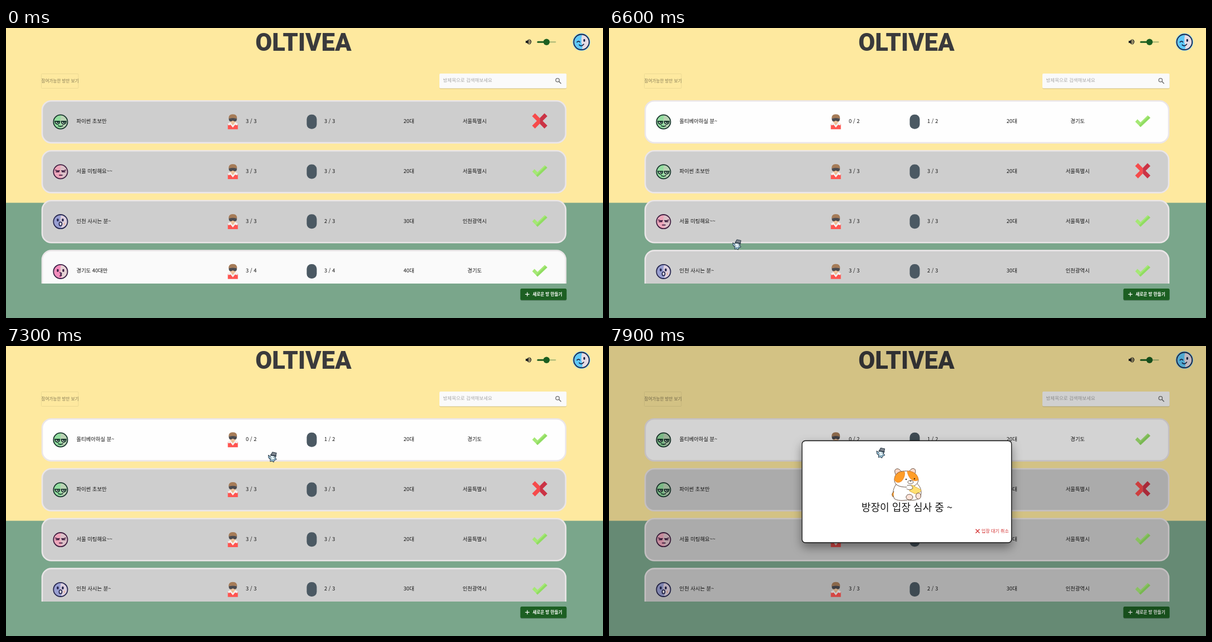
Animation of 1073x522 px, one loop 8 s. Source, as an HTML page:

```html
<!DOCTYPE html>
<html lang="ko">
<head>
<meta charset="utf-8">
<title>Room list</title>
<style>
html, body { margin: 0; width: 100%; height: 100%; overflow: hidden; background: #7aa68b; }
svg { display: block; width: 1073px; height: 522px; }
text { font-family: "Noto Sans CJK KR", "Noto Sans CJK", "Noto Sans", sans-serif; font-size: 9.4px; fill: #141414; }
.logo { font: 900 43.5px Roboto, "Open Sans", sans-serif; fill: #3a3a3c; }
.mid { text-anchor: middle; }
.line { fill: none; stroke-linecap: round; stroke-linejoin: round; }
</style>
</head>
<body>
<svg viewBox="0 0 1073 522" xmlns="http://www.w3.org/2000/svg">
  <defs>
    <clipPath id="list"><rect x="60" y="120" width="952" height="340"/></clipPath>
    <filter id="soft" x="-20%" y="-30%" width="140%" height="180%">
      <feDropShadow dx="0" dy="1" stdDeviation=".7" flood-opacity=".25"/>
    </filter>
    <filter id="deep" x="-20%" y="-30%" width="140%" height="180%">
      <feDropShadow dx="0" dy="8" stdDeviation="9" flood-opacity=".4"/>
    </filter>
    <g id="man">
      <path d="M-9 14V6Q-9 3-4 2H4Q9 3 9 6V14Z" fill="#ff5450"/>
      <path d="M-9 4L-4 1H4L9 4L8 7L4 6L0 11L-4 6L-8 7Z" fill="#f5f1ef"/>
      <path d="M-3-1H3V3L0 7L-3 3Z" fill="#eab98f"/>
      <ellipse cy="-3.5" rx="6.5" ry="7" fill="#f0c59e"/>
      <path d="M-7.5-4Q-8.5-13 0-13T7.5-4L6-6H-6Z" fill="#a67c58"/>
      <path d="M-7-5.5Q0-7 7-5.5Q8 0 3 0L0-1.5L-3 0Q-8 0-7-5.5Z" fill="#4b4b50"/>
    </g>
    <rect id="woman" x="-9" y="-13" width="18" height="26" rx="8.5" fill="#4b5963"/>
    <g id="yes">
      <path d="M-13.5 1.5L-9.5-3L-4 2.5L9-10L13.5-5.5L-4 11Z" fill="#a5e875"/>
      <path d="M-4 11L-6.5 8.3L10.9-8.2L13.5-5.5Z" fill="#90dc62"/>
    </g>
    <g id="no">
      <path d="M0-5L-8.5-13.7L-13.7-8.5L-5.2 0L-13.7 8.5L-8.5 13.7L0 5Z" fill="#f64b4b"/>
      <path d="M0-5L8.5-13.7L13.7-8.5L5.2 0L13.7 8.5L8.5 13.7L0 5Z" fill="#cb3345"/>
    </g>
  </defs>

  <rect width="1073" height="522" fill="#7aa68b"/>
  <rect width="1073" height="314.6" fill="#fee99f"/>
  <text class="logo mid" x="534.5" y="41.3">OLTIVEA</text>

  <path d="M934 23H936.5L939.5 20V30L936.5 27H934Z" fill="#222"/>
  <path class="line" d="M941 23Q942.4 25 941 27M941 20.8Q946.6 25 941 29.2" stroke="#222" stroke-width="1.2"/>
  <path class="line" d="M972 25.3H987.5" stroke="#a6b675" stroke-width="2"/>
  <path class="line" d="M956 25.3H972" stroke="#1b5e20" stroke-width="3"/>
  <circle cx="971.5" cy="25.3" r="5.7" fill="#1b5e20"/>
  <g id="profile" transform="translate(1034.3 25.3)"></g>

  <rect x="63.5" y="82.5" width="66.5" height="26" rx="1" fill="none" stroke="#ecda94"/>
  <text x="63.5" y="97.5" style="font-size:7.6px;fill:#857a55">참여가능한 방만 보기</text>
  <rect x="779" y="82" width="228.5" height="26.5" rx="2" fill="#fafafa" filter="url(#soft)"/>
  <text x="785.5" y="97.3" style="font-size:8.5px;fill:#a9a9a9">방제목으로 검색해보세요</text>
  <circle cx="991.3" cy="93.8" r="3.2" fill="none" stroke="#707070" stroke-width="1.3"/>
  <path class="line" d="M993.8 96.4L997.3 99.8" stroke="#707070" stroke-width="1.5"/>

  <g id="rooms" clip-path="url(#list)"></g>

  <rect x="924.5" y="469" width="83" height="20.8" rx="2.5" fill="#1b5e20" filter="url(#soft)"/>
  <path d="M933.2 479.3H940.8M937 475.5V483.1" stroke="#fff" stroke-width="1.2"/>
  <text x="946.5" y="482" style="font-size:7.6px;font-weight:700;fill:#fff">새로운 방 만들기</text>

  <g id="modal">
    <rect width="1073" height="522" opacity=".17"/>
    <rect x="347" y="170.5" width="376.5" height="183.5" rx="6" fill="#fff" stroke="#111" stroke-width="1.3" filter="url(#deep)"/>
    <g class="line" stroke="#4b3524" stroke-width=".9" stroke-dasharray="3 1">
      <path d="M516 249Q507 262 513 275Q521 280 537 277Q555 280 560 270Q564 257 553 247Z" fill="#fff"/>
      <path d="M515 231Q511 221 519 221Q523 222 525 226M540 225Q545 218 550 222Q552 227 549 231" fill="#ffd9c8"/>
      <path d="M513 241Q513 225 533 225Q554 225 556 241Q555 254 535 254Q513 254 513 241Z" fill="#fff"/>
      <path d="M513 241Q514 226 531 226Q533 235 526 243Q518 249 513 241ZM536 225Q554 226 556 241Q549 245 542 239Q537 233 536 225Z" fill="#ff9d28" stroke="#e9821d"/>
      <path d="M512 262Q506 267 511 272" fill="#ff9d28"/>
      <path d="M544 250L561 259Q560 265 550 266L540 261Z" fill="#ffdf70" stroke="#d8a73c"/>
      <path d="M536 251Q545 249 546 256Q541 261 535 257" fill="#fff"/>
      <ellipse cx="540" cy="272" rx="6" ry="5" fill="#ffe3d8"/>
      <ellipse cx="556" cy="270" rx="4.5" ry="5.5" fill="#ffe3d8"/>
      <ellipse cx="542" cy="245" rx="5" ry="3" fill="#fff"/>
    </g>
    <g fill="#33251d"><circle cx="534" cy="240" r="1.2"/><circle cx="549" cy="239" r="1.2"/><circle cx="542" cy="243" r="1"/></g>
    <text class="mid" x="535.5" y="296.5" style="font-size:18.1px">방장이 입장 심사 중 ~</text>
    <path d="M659 329.8L666 336.8M666 329.8L659 336.8" stroke="#d32f2f" stroke-width="1.3"/>
    <text x="669.5" y="336" style="font-size:8.1px;fill:#d32f2f">입장 대기 취소</text>
  </g>

  <g id="cursor" stroke="#33424f" stroke-linejoin="round">
    <path d="M-4-1L-7.5-3.5L-7 1L-4 4L-4 8L-1 7L2 9L3 6L7 4L5 1L5-2Z" fill="#a9dcf4" stroke-width="1.1"/>
    <ellipse cx="0" cy="1" rx="4.2" ry="4" fill="#e6f7ff" stroke-width=".7"/>
    <path d="M-2 1V2M2 0V1" stroke-width="1.2"/>
    <path d="M-3-4L0-9L7-7.5L6-2.5Z" fill="#7e858e" stroke-width="1.2"/>
    <path d="M-4-3.8L7-1.5" stroke-width="1.6"/>
  </g>
</svg>
<script>
const LOOP = 8000, ROW_STEP = 89.8;
const $ = id => document.getElementById(id);

const faces = {
  sleepy: `<path d="M-10-1H-1.5Q-2 4-5.5 4T-10-1ZM1.5-1H10Q9 4 5.5 4T1.5-1Z" fill="#e4f1e2"/><path d="M-6 1H-4M5 1H7M-4 7Q0 9 4 7"/>`,
  calm: `<path d="M-9-3Q-6-1-2-2M2-2Q6-1 9-3M-8 0H-3M3 0H8M-2 6H3"/>`,
  gasp: `<path d="M-5-4V-2M4-4V-2" stroke-width="3.4"/><ellipse cy="4" rx="2.5" ry="3.3" fill="#fff"/><path d="M5 4L8 1V7Z" fill="#e5b7a5" stroke="none"/>`,
  kiss: `<path d="M-5-3V-1M5-3V-1" stroke-width="3.2"/><path d="M-1 2Q4 3 0 5Q4 7-1 8"/>`,
  wink: `<path d="M-8 0Q-5-3-3 0M-4 5Q0 9 4 4"/><path d="M5-4V-2" stroke-width="3"/>`
};

function avatar(left, right, face, edge, r = 12.6) {
  return `<circle r="${r}" fill="${right}"/>
    <path d="M1 ${-r}A${r} ${r} 0 0 0 1 ${r}Q3 6 0 2Q-1-6 1 ${-r}Z" fill="${left}"/>
    <g class="line" stroke="${edge}" stroke-width="1.8"><circle r="${r}"/>${faces[face]}</g>`;
}

const green = avatar("#93dda0", "#b9d3b4", "sleepy", "#17352c");
const rooms = [
  { title: "올티베아하실 분~", men: "0 / 2", women: "1 / 2", age: "20대", area: "경기도", mark: "yes", fill: "#fefefe", face: green },
  { title: "파이썬 초보만", men: "3 / 3", women: "3 / 3", age: "20대", area: "서울특별시", mark: "no", face: green },
  { title: "서울 미팅해요~~", men: "3 / 3", women: "3 / 3", age: "20대", area: "서울특별시", mark: "yes", face: avatar("#eda6bb", "#dcc0c8", "calm", "#401e40") },
  { title: "인천 사시는 분~", men: "3 / 3", women: "2 / 3", age: "30대", area: "인천광역시", mark: "yes", face: avatar("#999fd2", "#ddd0df", "gasp", "#24254f") },
  { title: "경기도 40대만", men: "3 / 4", women: "3 / 4", age: "40대", area: "경기도", mark: "yes", fill: "#fafafa", face: avatar("#f58dbd", "#e7d2d5", "kiss", "#391d43") }
];

function roomRow(room) {
  const label = (x, text, cls = "") => `<text class="${cls}" x="${x}" y="41">${text}</text>`;
  const icon = (id, x, y) => `<use href="#${id}" x="${x}" y="${y}"/>`;
  return `<g><rect x="65" y="1.2" width="941" height="75.4" rx="16.5" fill="${room.fill || "#cecece"}" stroke="#ebe6e8" stroke-width="2.6"/>
    <g transform="translate(98 39)">${room.face}</g>
    ${label(126.5, room.title)}${icon("man", 407.7, 38.3)}${label(431, room.men)}
    ${icon("woman", 549.5, 38.7)}${label(572, room.women)}
    ${label(724, room.age, "mid")}${label(842.3, room.area, "mid")}
    ${icon(room.mark, 959.3, 37.2)}</g>`;
}

$("rooms").innerHTML = rooms.map(roomRow).join("");
$("profile").innerHTML = `<circle r="15.8" fill="#79c9f2"/>` + avatar("#5fc9fa", "#e5dce5", "wink", "#1a2547", 13.8);
const rows = [...$("rooms").children];

// Pointer positions: [time, x, y], each held until the next.
const pointer = [
  [6600, 230, 390], [6700, 310, 325], [6800, 400, 258], [6900, 465, 216], [7000, 488, 204],
  [7300, 479, 200], [7400, 482, 197], [7600, 486, 194], [7700, 488.5, 192.5]
];

function draw(t) {
  const shift = t < 5800 ? 1 : 0;
  rows.forEach((row, i) => {
    row.style.display = i < shift ? "none" : "";
    row.setAttribute("transform", `translate(0 ${130 + (i - shift) * ROW_STEP})`);
  });
  const spot = pointer.filter(p => p[0] <= t).pop();
  $("cursor").style.display = spot ? "" : "none";
  if (spot) $("cursor").setAttribute("transform", `translate(${spot[1]} ${spot[2]})`);
  $("modal").style.display = t >= 7900 ? "" : "none";
}

const start = performance.now();
function tick() {
  draw((performance.now() - start) % LOOP);
  requestAnimationFrame(tick);
}
tick();
</script>
</body>
</html>
```
